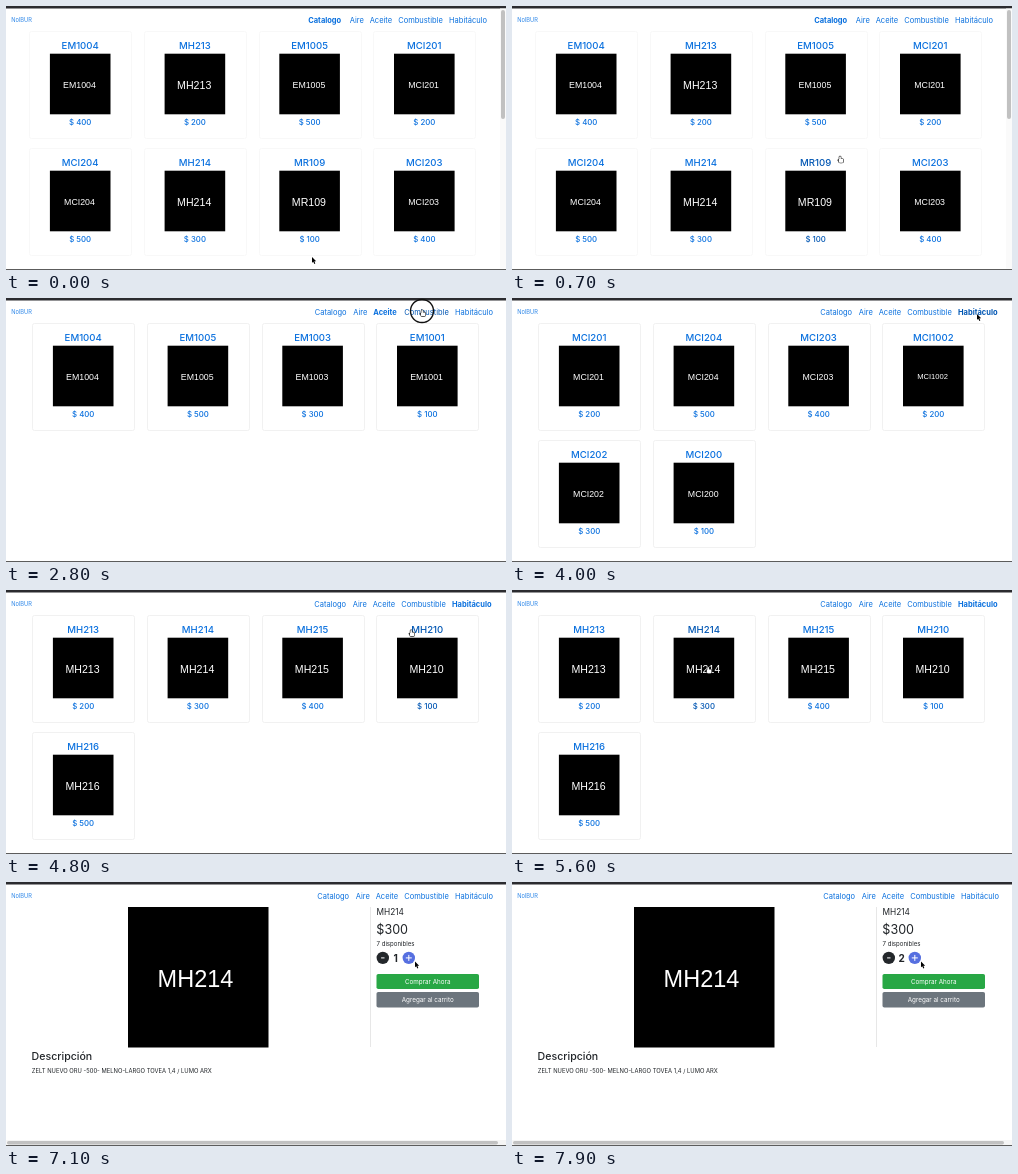
Recreate the animation shown at these times as an HTML page with a canvas. Size 500x264 px, loop 8 s.

```html
<!DOCTYPE html>
<html lang="es">
<head>
<meta charset="utf-8">
<title>Catálogo de filtros</title>
<style>
html, body { margin: 0; width: 100%; height: 100%; overflow: hidden; background: #fff; }
canvas { display: block; width: 500px; height: 264px; }
</style>
</head>
<body>
<canvas id="stage"></canvas>
<script>
const W = 500, H = 264, LOOP = 8000, STEP = 100;
const canvas = document.getElementById('stage');
const ctx = canvas.getContext('2d');
const ratio = Math.max(1, window.devicePixelRatio || 1);
canvas.width = W * ratio;
canvas.height = H * ratio;

const UI = 'Inter, "Open Sans", sans-serif';
const PLAIN = '"Liberation Sans", Arial, sans-serif';
const BLUE = '#0a70de', DARK_BLUE = '#0056b3', INK = '#212529';

const MENU = [
  { label: 'Catalogo', width: 32, bold: 35 },
  { label: 'Aire', width: 13.5, bold: 15.5 },
  { label: 'Aceite', width: 22, bold: 24.5 },
  { label: 'Combustible', width: 44.3, bold: 47 },
  { label: 'Habitáculo', width: 38, bold: 41 }
];
const MENU_GAP = 6.5;

const LISTS = {
  all: ['EM1004 400', 'MH213 200', 'EM1005 500', 'MCI201 200',
        'MCI204 500', 'MH214 300', 'MR109 100', 'MCI203 400'],
  em: ['EM1004 400', 'EM1005 500', 'EM1003 300', 'EM1001 100'],
  mci: ['MCI201 200', 'MCI204 500', 'MCI203 400', 'MCI1002 200', 'MCI202 300', 'MCI200 100'],
  mh: ['MH213 200', 'MH214 300', 'MH215 400', 'MH210 100', 'MH216 500']
};

// [start time, value]
const PAGES = [[0, 'all'], [1700, 'em'], [3100, 'mci'], [4200, 'mh'], [6000, 'detail']];
const ACTIVE = [[0, 0], [1400, 1], [2200, 2], [2900, 3], [3900, 4], [6000, -1]];
const AMOUNT = [[0, 0], [7000, 1], [7500, 2]];
const CLICKS = [1300, 2100, 2800, 3800, 5700, 6900, 7400];
const IMAGE_AT = 6600;

// [time, x, y]
const PATH = [
  [0, 306, 251], [300, 306, 251], [1200, 358.5, 12], [1600, 358.5, 12],
  [2000, 380, 13], [2200, 380, 13], [2700, 416, 13], [3200, 416, 13],
  [3700, 465, 16], [4100, 465, 16], [4800, 405, 41], [5500, 196, 78],
  [5900, 196, 78], [6300, 377, 83.5], [6500, 377, 83.5], [6800, 409, 79.5], [8000, 409, 79.5]
];

function stateAt(list, t) {
  let value = list[0][1];
  for (const [start, next] of list) if (t >= start) value = next;
  return value;
}

function cursorAt(t) {
  let i = 0;
  while (i < PATH.length - 2 && PATH[i + 1][0] <= t) i++;
  const [t0, x0, y0] = PATH[i], [t1, x1, y1] = PATH[i + 1];
  const p = (t - t0) / (t1 - t0), e = p * p * (3 - 2 * p);
  return { x: x0 + (x1 - x0) * e, y: y0 + (y1 - y0) * e };
}

function inside(p, x, y, w, h) {
  return p.x >= x && p.x <= x + w && p.y >= y && p.y <= y + h;
}

function rect(x, y, w, h, color) {
  ctx.fillStyle = color;
  ctx.fillRect(x, y, w, h);
}

function pill(x, y, w, h, r, color) {
  ctx.beginPath();
  ctx.roundRect(x, y, w, h, r);
  ctx.fillStyle = color;
  ctx.fill();
}

function disc(x, y, r, color) {
  ctx.beginPath();
  ctx.arc(x, y, r, 0, Math.PI * 2);
  ctx.fillStyle = color;
  ctx.fill();
}

// y is the middle of the capitals
function text(str, x, y, size, color, { weight = 400, align = 'left', family = UI } = {}) {
  ctx.font = `${weight} ${size}px ${family}`;
  ctx.textAlign = align;
  ctx.fillStyle = color;
  ctx.fillText(str, x, y + size * 0.36);
}

function drawNav(active, right, cursor) {
  text('NolBUR', 5.3, 14.2, 5.7, '#2c86e8');
  let x = right, hot = false;
  for (let i = MENU.length - 1; i >= 0; i--) {
    const item = MENU[i], on = i === active;
    const w = on ? item.bold : item.width;
    x -= w;
    const over = inside(cursor, x - 1, 8, w + 2, 12);
    hot = hot || over;
    text(item.label, x, 14, 7.5, over ? DARK_BLUE : BLUE, { weight: on ? 700 : 400 });
    x -= MENU_GAP;
  }
  return hot;
}

function drawCards(page, cursor) {
  const first = page === 'all' ? 74.2 : 77.2;
  let hot = false;
  LISTS[page].forEach((entry, i) => {
    const [code, price] = entry.split(' ');
    const cx = first + (i % 4) * 114.7;
    const y = 25 + Math.floor(i / 4) * 117;
    const over = inside(cursor, cx - 51, y, 102, 107);
    hot = hot || over;
    const color = over ? DARK_BLUE : BLUE;
    ctx.beginPath();
    ctx.roundRect(Math.round(cx - 51) + 0.5, y + 0.5, 102, 107, 2);
    ctx.strokeStyle = page === 'all' ? '#f6f6f6' : '#eeeeee';
    ctx.lineWidth = 0.8;
    ctx.stroke();
    text(code, cx, y + 14.3, 9.6, color, { weight: 500, align: 'center' });
    rect(cx - 30.3, y + 22.7, 60.6, 60.6, '#000');
    const size = { 5: 10.6, 6: 8.8, 7: 7.6 }[code.length];
    text(code, cx - 0.7, y + 53.7, size, '#fff', { align: 'center', family: PLAIN });
    text('$ ' + price, cx, y + 91, 7.8, color, { weight: 500, align: 'center' });
  });
  return hot;
}

function drawDetail(amount, loaded, cursor) {
  const shift = loaded ? 70.5 : 0;
  if (loaded) {
    rect(122, 25, 140.5, 140.5, '#000');
    text('MH214', 189.5, 97, 23.5, '#fff', { align: 'center', family: PLAIN });
  }
  text('Descripción', 25.6, 103.4 + shift, 10.6, INK, { weight: 500 });
  text('ZELT NUEVO ORU -500- MELNO-LARGO TOVEA 1,4 / LUMO ARX', 25.8, 118 + shift, 5.85, INK);

  rect(364, 25, 0.8, loaded ? 140 : 70, '#e2e2e2');
  text('MH214', 370.5, 29.8, 8.3, INK);
  text('$300', 370.3, 47.7, 12.6, INK);
  text('7 disponibles', 370.5, 62, 6.1, INK);

  const plusHot = Math.hypot(cursor.x - 403, cursor.y - 76) < 9;
  disc(376.8, 75.9, 6.2, '#23272b');
  disc(402.8, 75.9, 6.2, plusHot ? '#566fe0' : '#23272b');
  rect(375.1, 75.4, 3.4, 1, '#fff');
  rect(399.8, 75.4, 6, 1, '#fff');
  rect(402.3, 72.9, 1, 6, '#fff');
  text(String(amount), 389.7, 76, 10, INK, { weight: 700, align: 'center' });

  if (amount > 0) {
    pill(370.5, 92, 102.5, 15, 1.8, '#28a745');
    text('Comprar Ahora', 421.7, 99.5, 6.3, '#fff', { align: 'center' });
    pill(370.5, 110, 102.5, 15.5, 1.8, '#6c757d');
    text('Agregar al carrito', 421.7, 117.7, 6.3, '#fff', { align: 'center' });
  }
}

function drawArrow({ x, y }) {
  ctx.beginPath();
  ctx.moveTo(x, y);
  for (const [dx, dy] of [[0, 5.8], [1.3, 4.7], [2.3, 6.9], [3.3, 6.4], [2.4, 4.3], [4.2, 4.2]]) {
    ctx.lineTo(x + dx, y + dy);
  }
  ctx.closePath();
  ctx.lineWidth = 0.9;
  ctx.strokeStyle = '#fff';
  ctx.stroke();
  ctx.fillStyle = '#000';
  ctx.fill();
}

function drawHand({ x, y }) {
  ctx.beginPath();
  ctx.roundRect(x - 0.6, y - 1, 1.5, 4.6, 0.7);
  ctx.roundRect(x - 1.1, y + 1.4, 4.5, 3.9, 1.2);
  ctx.moveTo(x - 0.9, y + 4.3);
  ctx.lineTo(x - 2.1, y + 2.3);
  ctx.lineWidth = 1.2;
  ctx.strokeStyle = '#222';
  ctx.stroke();
  ctx.fillStyle = '#fff';
  ctx.fill();
}

function drawFrame(page) {
  rect(0, 0, W, 2.5, '#2b2b2f');
  if (page === 'all') {
    rect(494, 2.5, 6, 260, '#fafafa');
    pill(495, 4, 4, 109, 2, '#c1c1c1');
  }
  if (page === 'detail') {
    rect(0, 258, W, 5, '#f5f5f5');
    pill(1, 259, 491, 3.4, 1.7, '#c1c1c1');
  }
  rect(0, 263, W, 1, '#5c5c5c');
}

function draw(t) {
  const page = stateAt(PAGES, t);
  const cursor = cursorAt(t);
  ctx.setTransform(ratio, 0, 0, ratio, 0, 0);
  rect(0, 0, W, H, '#fff');

  let hot = drawNav(stateAt(ACTIVE, t), page === 'all' ? 481 : 487, cursor);
  if (page === 'detail') drawDetail(stateAt(AMOUNT, t), t >= IMAGE_AT, cursor);
  else hot = drawCards(page, cursor) || hot;
  drawFrame(page);

  if (CLICKS.some(c => t >= c && t < c + STEP)) {
    ctx.beginPath();
    ctx.arc(cursor.x, cursor.y, 11.5, 0, Math.PI * 2);
    ctx.lineWidth = 1.4;
    ctx.strokeStyle = '#111';
    ctx.stroke();
  }
  const lateArrow = t >= 3600 && t <= 4100;
  (hot && !lateArrow ? drawHand : drawArrow)(cursor);
}

const began = performance.now();
function tick() {
  const t = (performance.now() - began) % LOOP;
  draw(Math.floor(t / STEP) * STEP);
  requestAnimationFrame(tick);
}
tick();
</script>
</body>
</html>
```
